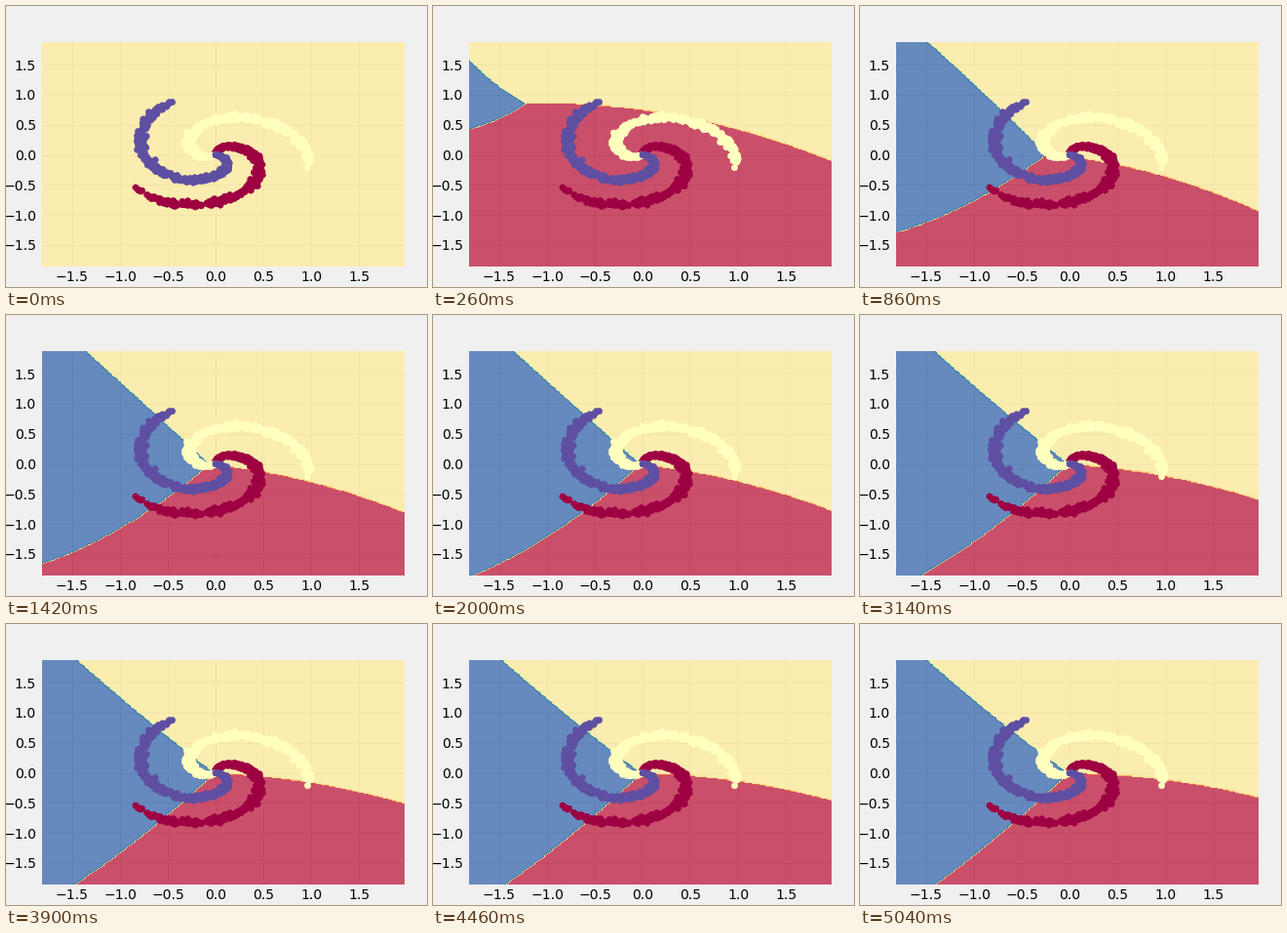
These frames come from a looping animation (432 by 288 pixels, 5060 ms). A matplotlib script:

```python
import numpy as np
import matplotlib.pyplot as plt
from matplotlib.animation import FuncAnimation

plt.style.use("fivethirtyeight")
plt.rcParams["font.family"] = "DejaVu Sans"

STEP_MS, FRAMES = 20, 253
START_MS, SWEEP_MS = 120, 260
XLIM, YLIM = (-1.84, 1.99), (-1.871, 1.916)
LEVELS = np.arange(0, 2.01, 0.25)

# Slope and bend of each border, seen from the junction, at four moments.
MOMENTS = np.log([SWEEP_MS, 860, 2000, 5040])
BORDERS = {
    "blue_yellow": ([0.5, 1.0, 0.88, 0.72], [-4.5, 0.45, -0.1, -0.56]),
    "blue_red": ([-0.65, -0.75, -0.92, -0.95], [-3.5, -1.5, -1.5, -0.83]),
    "yellow_red": ([-0.03, 0.08, 0.1, 0.0], [0.69, 0.85, 0.71, 0.64]),
}


def spirals(n=400, noise=0.1):
    rng = np.random.RandomState(0)
    r = np.linspace(0, 1, n)
    arms = []
    for k in range(3):
        t = 4 * (k + r) + noise * rng.randn(n)
        arms.append(np.c_[r * np.sin(t), r * np.cos(t)])
    return np.vstack(arms), np.repeat(np.arange(3), n)


def junction(ms):
    """Point where the three regions meet, settling exponentially."""
    age = ms - SWEEP_MS
    rise = np.clip((ms - START_MS) / (SWEEP_MS - START_MS), 0, 1)
    x = 213 - 118 * np.exp(-age / 360)
    y = 153 - 53 * np.exp(-age / 150) + 280 * (1 - rise) ** 2
    return x, y


def border(name, d, ms):
    slope, bend = (np.interp(np.log(ms), MOMENTS, v) for v in BORDERS[name])
    return slope * d + bend * d ** 2 / 1000


def classify(ms):
    ms = max(ms, START_MS)
    jx, jy = junction(ms)
    dx, dy = px - jx, py - jy
    left = dx < 0
    low = border("blue_red", dx, ms)
    floor = np.where(left, low, border("yellow_red", dx, ms))
    z = np.where(dy > floor, 0, 1)
    z[left & (dy > border("blue_yellow", dx, ms)) & (dy <= low)] = 2
    return z


fig, ax = plt.subplots(figsize=(6, 4), dpi=72)
ax.set(xlim=XLIM, ylim=YLIM, autoscale_on=False)
xx, yy = np.meshgrid(np.arange(XLIM[0], XLIM[1] + 0.01, 0.02),
                     np.arange(YLIM[0], YLIM[1] + 0.01, 0.02))
px, py = ax.transData.transform(np.c_[xx.ravel(), yy.ravel()]).T
px, py = px.reshape(xx.shape), 288 - py.reshape(xx.shape)

pts, labels = spirals()
ax.scatter(pts[:, 0], pts[:, 1], c=labels, s=40, cmap="Spectral",
           linewidths=0.5, zorder=2)
regions = None


def draw(i):
    global regions
    if regions is not None:
        regions.remove()
    regions = ax.contourf(xx, yy, classify(i * STEP_MS), levels=LEVELS,
                          cmap="Spectral", alpha=0.8, zorder=1)
    ax.set(xlim=XLIM, ylim=YLIM)


anim = FuncAnimation(fig, draw, frames=FRAMES, interval=STEP_MS,
                     init_func=lambda: None, repeat=True, repeat_delay=0)
plt.show()
```
